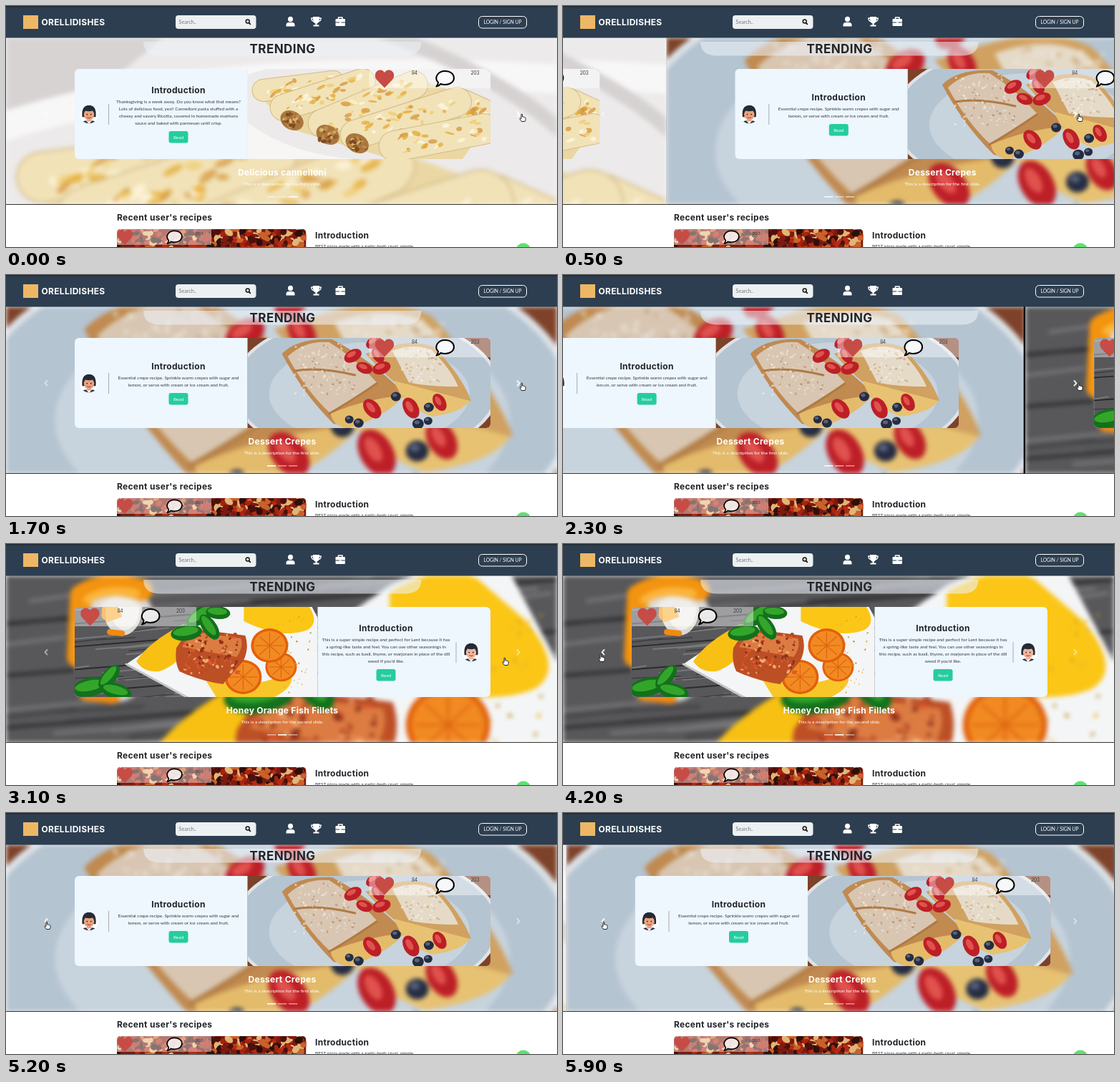
Write an HTML page that moves like this. It is 770 px wide and 337 px high and loops after 6 s.

```html
<!DOCTYPE html>
<html lang="en">
<head>
<meta charset="utf-8">
<title>Recipes carousel</title>
<style>
  html, body { margin: 0; width: 100%; height: 100%; overflow: hidden; background: #fff; }
  svg { display: block; }
  text { font-family: Lato, sans-serif; fill: #343a40; }
  .head { font-family: Inter, sans-serif; font-weight: 700; letter-spacing: .025em; fill: #212529; }
  .white { fill: #fff; }
  .mid { text-anchor: middle; }
</style>
</head>
<body>
<svg id="stage" width="770" height="337" viewBox="0 0 770 337"></svg>
<script>
const LOOP = 6000, STEP = 100, SLIDE = 600, W = 770;

let seed = 7;
const rnd = (a = 0, b = 1) => {
  seed = (seed * 16807) % 2147483647;
  return a + (b - a) * seed / 2147483647;
};
const repeat = (n, make) => Array.from({ length: n }, (_, i) => make(i)).join('');

// ---- drawing helpers ----
const rect = (x, y, w, h, fill, more = '') =>
  `<rect x="${x}" y="${y}" width="${w}" height="${h}" fill="${fill}" ${more}/>`;
const oval = (x, y, rx, ry, fill, turn = 0, more = '') =>
  `<ellipse cx="${x}" cy="${y}" rx="${rx}" ry="${ry}" fill="${fill}" transform="rotate(${turn} ${x} ${y})" ${more}/>`;
const shape = (d, fill, more = '') => `<path d="${d}" fill="${fill}" ${more}/>`;
const line = (d, color, width, more = '') =>
  `<path d="${d}" fill="none" stroke="${color}" stroke-width="${width}" stroke-linecap="round" stroke-linejoin="round" ${more}/>`;
const text = (x, y, size, str, cls = '') =>
  `<text x="${x}" y="${y}" dy=".35em" font-size="${size}" class="${cls}">${str}</text>`;
const at = (x, y, s, body) => `<g transform="translate(${x} ${y}) scale(${s})">${body}</g>`;
const specks = (n, x0, y0, x1, y1, r, colors, more = '') => repeat(n, i =>
  oval(rnd(x0, x1), rnd(y0, y1), rnd(r * .4, r), rnd(r * .3, r * .7), colors[i % colors.length], rnd(0, 180), more));

// ---- dishes, in the 339 x 126 space of a card picture ----
function cannelloni() {
  const roll = (x1, y1, x2, y2, w) => {
    const d = `M${x1} ${y1}L${x2} ${y2}`;
    const spots = repeat(30, i => {
      const k = rnd(.08, 1), j = w * .36;
      return oval(x1 + (x2 - x1) * k + rnd(-j, j) * .5, y1 + (y2 - y1) * k + rnd(-j, j),
        rnd(2, 7), rnd(1, 3.5), ['#e5a92f', '#efcb6c', '#d6953a', '#fff7e2'][i % 4], rnd(-50, 20), 'opacity=".75"');
    });
    return line(d, '#d3bb86', w + 2) + line(d, '#f1e2b8', w) + spots;
  };
  const filling = (x, y) => oval(x, y, 17, 13, '#a9773d', 30) +
    specks(22, x - 12, y - 9, x + 12, y + 9, 4, ['#7c4a22', '#c28b4b', '#935c2d', '#d9b36e']);
  return rect(-5, -70, 350, 240, '#eceaea') +
    shape('M0 -60L100 -60Q60 -20 0 5Z', '#d6d3d2') +
    line('M-5 0Q130 -45 345 -30', '#f8f7f7', 18) +
    line('M230 -60Q310 -30 345 5', '#d5d2d1', 9) +
    shape('M0 75Q60 120 150 126L0 126Z', '#f7f6f4') +
    shape('M10 30L120 8L240 14L325 45L339 70L300 126H200L60 84Z', '#ead7a3') +
    roll(300, 48, 335, 64, 38) +
    roll(22, 30, 120, 18, 30) + roll(50, 54, 160, 18, 36) +
    roll(104, 76, 232, 22, 38) + roll(150, 92, 292, 46, 40) + roll(205, 108, 330, 84, 42) +
    filling(62, 72) + filling(112, 92) + filling(153, 104);
}

function crepes() {
  const berry = (x, y, r = 7) => oval(x, y, r, r * .92, '#252c42') + oval(x - 1.5, y - 2, r * .45, r * .35, '#56617c');
  const straw = (x, y, turn, s = 1) => oval(x, y, 13 * s, 8.5 * s, '#bd1f27', turn) +
    oval(x - 2, y - 2, 7 * s, 3.5 * s, '#e0524e', turn);
  return rect(-5, -60, 350, 240, '#7d4229') +
    oval(165, 70, 187, 103, '#dde3e8') + oval(165, 70, 182, 99, '#b5c4d1') + oval(170, 78, 140, 72, '#c7d3dd') +
    shape('M48 22Q70 0 118 2Q165 25 222 80L165 112Q140 126 120 120Q76 76 48 22Z', '#c08a50') +
    shape('M56 26Q80 3 114 6Q150 28 180 62Q140 90 114 104Q82 74 56 26Z', '#d8c6b2') +
    line('M180 64Q145 88 114 106M66 46Q100 40 150 52', '#b07a42', 3) +
    shape('M190 14Q235 0 262 14Q300 55 312 88Q262 84 226 78Q190 52 165 22Z', '#d0a160') +
    shape('M202 18Q235 6 258 18Q284 44 294 68Q250 68 225 62Z', '#e5dac8') +
    shape('M205 60Q250 72 310 88Q300 104 258 110Q215 95 205 60Z', '#e7c272') +
    shape('M116 106Q160 86 220 80Q190 112 142 126Q120 126 116 106Z', '#e3bb6b') +
    specks(110, 66, 8, 150, 80, 2.4, ['#f2ece6', '#b98e66', '#eae0d6'], 'opacity=".7"') +
    specks(60, 215, 14, 270, 62, 2.4, ['#f5f0e8', '#c9a474'], 'opacity=".7"') +
    straw(176, 6, -35, .9) + straw(147, 25, -30) + straw(182, 24, 60, .9) +
    straw(163, 42, 20, .9) + straw(187, 42, -20) +
    berry(207, 82) + straw(174, 99, 50, 1.2) + straw(228, 98, 60, 1.2) + berry(155, 119) +
    berry(142, 114, 6) + berry(238, 120, 8) + berry(253, 97) + straw(268, 90, 60) + berry(252, 116, 6);
}

function fish() {
  const orange = (x, y, r) => oval(x, y, r, r * .92, '#e2600a') + oval(x, y, r * .86, r * .79, '#f28a22') +
    repeat(8, i => line(`M${x} ${y}L${x + r * .75 * Math.cos(i * .785)} ${y + r * .68 * Math.sin(i * .785)}`, '#dd6510', 1.2));
  const leaf = (x, y, rx, ry, turn) => oval(x, y, rx, ry, '#13701c', turn) +
    oval(x - 1, y - 2, rx * .8, ry * .55, '#34a52b', turn);
  const grain = (n, color, width) => repeat(n, () => {
    const x = rnd(-20, 300), y = rnd(-60, 130);
    return line(`M${x} ${y}l${rnd(30, 90)} ${rnd(-8, -3)}`, color, width);
  });
  return rect(-5, -70, 350, 240, '#58585b') + grain(45, '#78777a', 2) + grain(35, '#3d3d40', 1.5) +
    repeat(6, i => line(`M-5 ${-40 + i * 32}L345 ${-68 + i * 32}`, '#2b2b2d', 2)) +
    // cup with orange wedges
    oval(67, 2, 27, 38, '#dcd9d4') + oval(70, 3, 20, 29, '#efedea') +
    line('M84 -29Q62 -36 46 -26L44 12', '#f3930f', 13) + line('M80 -27Q62 -31 50 -23', '#fbb53c', 5) +
    shape('M42 -10Q62 -8 66 14L44 22Z', '#f9b13a') + line('M49 35L66 37', '#f08a12', 8) +
    // plate
    shape('M72 80L191 0L236 -32Q275 -50 311 -38L339 15L350 40V150H200Z', '#f4f5f6') +
    line('M72 80L200 150', '#c9c7c5', 3) +
    shape('M86 76Q104 48 152 24L165 40Q150 80 118 90Q96 92 86 76Z', '#f8c012') +
    shape('M236 -28Q268 -46 290 -36L320 -10Q345 20 325 32Q290 46 236 20Z', '#fbc616') +
    shape('M180 98Q240 120 300 92Q312 112 270 130H200Z', '#f9c62a') +
    orange(288, 84, 22) + orange(272, 54, 26) + orange(235, 98, 26) +
    // fillet
    shape('M160 30L238 40Q244 58 235 76L207 108Q176 104 146 90Q139 76 142 57Z', '#bd4f25') +
    shape('M162 34L232 44Q236 56 226 70L150 56Z', '#dc7c42') +
    specks(110, 152, 38, 230, 94, 3.2, ['#8c3018', '#eeaa6e', '#b34824', '#e0582c']) +
    leaf(176, 12, 24, 11, -35) + leaf(156, 36, 22, 11, -8) + leaf(188, 28, 20, 10, 55) + leaf(200, 8, 17, 9, 5) +
    leaf(22, 112, 26, 13, -12) + leaf(48, 98, 20, 10, -50) + leaf(58, 118, 22, 11, 15) +
    specks(40, 290, -20, 334, 124, 1.6, ['#b9942e', '#e9b428']);
}

// ---- interface parts ----
const heart = shape('M13.5 25L2.5 13.5C-1.5 9 0 1 6.5 0C10 -.5 12 1.5 13.5 3.5C15 1.5 17 -.5 20.5 0C27 1 28.5 9 24.5 13.5Z', '#c64c45');
const bubble = shape('M13.5 1C21 1 26 5 26 10.5S21 20 13.5 20Q10 20 7.5 19Q5 22 1.5 22.5Q4 19 4 17C-2.5 9.5 4 1 13.5 1Z',
  '#fff', 'fill-opacity=".8" stroke="#000" stroke-width="2" stroke-linejoin="round"');

const reactions = x => rect(x, 88, 170, 27, '#fff', 'opacity=".42"') +
  at(x + 8, 89.5, 1, heart) + text(x + 63.5, 94, 6.8, '84', 'mid') +
  at(x + 92.5, 90, 1, bubble) + text(x + 148, 94, 6.8, '203', 'mid');

const avatar = (x, skin) => `<g clip-path="url(#face)" transform="translate(${x} 151.5)">` +
  rect(-13, -13, 26, 26, '#fff') + at(0, 2.5, 1.25, oval(0, 12, 12, 7.5, '#2b3c4e') + shape('M-4 4H4L0 9Z', '#fff') +
    rect(-2.5, 1, 5, 5, skin) + shape('M-7.5 1Q-9 -12 0 -12.5Q9 -12 7.500 1Z', '#232b38') + oval(0, -2, 5.8, 6.5, skin) +
    shape('M-6.500 -3Q-7 -10 0 -10Q7 -10 6.500 -3L4 -6Q0 -5 -4 -6Z', '#232b38') +
    oval(-2.2, -2, .7, .7, '#222') + oval(2.2, -2, .7, .7, '#222') + line('M-2 1.5Q0 3 2 1.5', '#a13d35', .8)) + '</g>';

const slides = [
  { dish: crepes, rise: -8, title: 'Dessert Crepes', nth: 'first',
    body: ['Essential crepe recipe. Sprinkle warm crepes with sugar and', 'lemon, or serve with cream or ice cream and fruit.'] },
  { dish: fish, rise: 38, title: 'Honey Orange Fish Fillets', nth: 'second', flip: true,
    body: ['This is a super simple recipe and perfect for Lent because it has', 'a spring-like taste and feel. You can use other seasonings in',
      'this recipe, such as basil, thyme, or marjoram in place of the dill', 'weed if you\'d like.'] },
  { dish: cannelloni, rise: 56, title: 'Delicious cannelloni', nth: 'third',
    body: ['Thanksgiving is a week away. Do you know what that means?', 'Lots of delicious food, yes!! Cannelloni pasta stuffed with a',
      'cheesy and savory Ricotta, covered in homemade marinara', 'sauce and baked with parmesan until crisp.'] }
];

function slideMarkup(s) {
  const photo = s.dish();
  const mid = s.flip ? 531 : 241, photoX = s.flip ? 96 : 337.5;
  const top = s.body.length > 2 ? 118 : 128, button = top + 17 + s.body.length * 10;
  return `<g class="slide">${rect(0, 44, W, 234, '#f4f4f4')}
    <g filter="url(#soft)"><svg x="0" y="44" width="770" height="234" viewBox="0 ${-s.rise} 339 103" preserveAspectRatio="none">${photo}</svg></g>
    ${rect(0, 277, W, 1, '#333')}${rect(-2.5, 44, 2.5, 234, '#0a0a0a')}
    <g clip-path="url(#card)">${rect(96, 88, 581, 126, '#eef6fe')}
      <svg x="${photoX}" y="88" width="339.5" height="126" viewBox="0 0 339 126" preserveAspectRatio="none">${photo}</svg>
      ${reactions(s.flip ? 96 : 507.5)}</g>
    ${text(mid, top, 12, 'Introduction', 'head mid')}
    ${s.body.map((str, i) => text(mid, top + 15.5 + i * 10, 6.5, str, 'mid')).join('')}
    ${rect(mid - 13.5, button, 27, 16.5, '#25cd9d', 'rx="3"')}${text(mid, button + 8.3, 6.5, 'Read', 'white mid')}
    ${rect(s.flip ? 628.5 : 143, 137, 1, 29, '#a3abb3')}${avatar(s.flip ? 650 : 116, s.flip ? '#f0b59b' : '#eaa27f')}
    ${text(386, 233, 12, s.title, 'head white mid')}
    ${text(386, 249, 6.5, `This is a description for the ${s.nth} slide.`, 'white mid')}</g>`;
}

const header = rect(0, 0, W, 44.5, '#2c3e50') + rect(0, 0, W, 1.5, '#222a33') +
  rect(24, 13, 21, 19, '#edb765') + text(49.5, 22.5, 12, 'ORELLIDISHES', 'head white') +
  rect(237, 13, 112.5, 19, '#ecf0f1', 'rx="4"') + `<g opacity=".65">${text(241.5, 22.3, 7.2, 'Search..')}</g>` +
  line('M339.8 23.8L341.3 25.3', '#111', 1.8) + `<circle cx="337.7" cy="21.5" r="2.5" fill="none" stroke="#111" stroke-width="1.4"/>` +
  oval(397.5, 18.5, 3.5, 3.7, '#fff') + shape('M391.5 28.5V26.5Q391.5 23 395 23H400Q403.5 23 403.5 26.5V28.5Z', '#fff') +
  shape('M429 15H438V19Q437 24 434.5 24.5V26.5H437.5V28.5H429.5V26.5H432.5V24.5Q430 24 429 19Z', '#fff') +
  line('M429 17H426.8Q427 21.5 431 22M438 17H440.2Q440 21.5 436 22', '#fff', 1.4) +
  rect(460.5, 18, 13.5, 10, '#fff', 'rx="1.3"') + line('M464.5 18V16H470V18', '#fff', 1.5) +
  line('M460.5 23H474', '#2c3e50', 1) + rect(466, 22.3, 2.6, 2, '#fff') +
  rect(660.5, 14.5, 67, 16.5, 'none', 'rx="5" stroke="#fff"') + text(694, 22.7, 6.7, 'LOGIN / SIGN UP', 'white mid');

const recent = rect(0, 278, W, 59, '#fff') + text(155, 295.5, 12, 'Recent user\'s recipes', 'head') +
  `<g clip-path="url(#pizza)">${rect(155, 312, 264.5, 30, '#7a1a0e')}` +
  specks(260, 155, 312, 420, 338, 7, ['#4d100b', '#a8230f', '#c9622a', '#2e0f0b', '#e2b577', '#7d1a10', '#b52a14']) +
  rect(155, 312, 132, 22, '#fff', 'opacity=".42"') + '</g>' +
  at(155, 313, .83, heart) + at(224, 313.5, .84, bubble) + text(270, 317.5, 6.5, '203', 'mid') +
  text(432, 321, 12, 'Introduction', 'head') + text(432, 336, 6.5, 'BEST pizza made with a garlic-herb crust, simple') +
  oval(723, 342, 10.5, 10.5, '#5fe070');

const hand = shape('M-2 -4.5Q-1.2 -5.5 -.4 -4.5V-1Q1 -1.6 1.5 -.7Q2.7 -1 3 0Q4.3 0 4.2 1.5Q4.2 3.5 3.2 5.5H-1.6Q-3 3.2 -4.2 1.5Q-3.6 .2 -2 1.5Z',
  '#fff', 'stroke="#111" stroke-width=".9"');

const stage = document.getElementById('stage');
stage.innerHTML = `<defs>
  <filter id="soft" filterUnits="userSpaceOnUse" x="0" y="44" width="770" height="234" color-interpolation-filters="sRGB"><feGaussianBlur stdDeviation="3.2"/></filter>
  <clipPath id="card"><rect x="96" y="88" width="581" height="126" rx="6"/></clipPath>
  <clipPath id="pizza"><rect x="155" y="312" width="264.5" height="40" rx="5"/></clipPath>
  <clipPath id="face"><circle r="12.8"/></clipPath></defs>
  ${rect(0, 0, W, 337, '#fff')}${slides.map(slideMarkup).join('')}
  ${shape('M192 50H580.5Q580 69.5 557 69.5H215.5Q192.5 69.5 192 50Z', '#edf3f9', 'opacity=".56"')}
  ${text(386.5, 60, 17, 'TRENDING', 'head mid')}
  ${line('M57.5 148L54.5 151.3L57.5 154.6', '#fff', 1.9, 'class="arrow"')}
  ${line('M714.5 148L717.5 151.3L714.5 154.6', '#fff', 1.9, 'class="arrow"')}
  ${repeat(3, i => rect(365 + i * 15, 266, 12.3, 1.6, '#fff', 'class="dot"'))}
  ${recent}${header}<g id="hand">${hand}</g>`;

// ---- motion ----
// start, from, to, direction
const moves = [[80, 2, 0, 1], [2133, 0, 1, 1], [4582, 1, 0, -1], [5867, 0, 2, -1]];
// time, x, y
const path = [[0, 722, 156], [2950, 722, 156], [3100, 698, 164], [3850, 54, 159], [4400, 54, 159], [4550, 58, 157], [LOOP, 58, 157]];

const all = name => [...stage.querySelectorAll(name)];
const slideEls = all('.slide'), dots = all('.dot'), arrows = all('.arrow'), handEl = document.getElementById('hand');

// cubic-bezier(.42, 0, .58, 1)
function easeInOut(x) {
  if (x <= 0 || x >= 1) return x <= 0 ? 0 : 1;
  let lo = 0, hi = 1, s = .5;
  for (let i = 0; i < 24; i++) {
    s = (lo + hi) / 2;
    const bx = 3 * s * (1 - s) * (.42 * (1 - s) + .58 * s) + s ** 3;
    if (bx < x) lo = s; else hi = s;
  }
  return s * s * (3 - 2 * s);
}

function pointer(t) {
  const i = path.findIndex(p => p[0] > t);
  const a = path[i - 1], b = path[i], k = (t - a[0]) / (b[0] - a[0]);
  return [a[1] + (b[1] - a[1]) * k, a[2] + (b[2] - a[2]) * k];
}

function draw(t) {
  const [start, from, to, dir] = moves.filter(m => m[0] <= t).pop() || [0, 2, 2, 0];
  const k = easeInOut((t - start) / SLIDE);
  slideEls.forEach((el, i) => {
    const x = i === to ? dir * W * (1 - k) : -dir * W * k;
    const shown = i === to || (i === from && k < 1);
    el.style.display = shown ? '' : 'none';
    el.setAttribute('transform', `translate(${x.toFixed(2)} 0)`);
  });
  dots.forEach((el, i) => {
    const on = from === to ? +(i === to) : i === to ? k : i === from ? 1 - k : 0;
    el.setAttribute('opacity', .5 + .5 * on);
  });
  const [px, py] = pointer(t);
  arrows[0].setAttribute('opacity', px < 110 ? .9 : .5);
  arrows[1].setAttribute('opacity', px > 705 ? .9 : .5);
  handEl.setAttribute('transform', `translate(${px} ${py})`);
}

const origin = performance.now();
let last = 0;
function tick() {
  const t = Math.floor((performance.now() - origin) % LOOP / STEP) * STEP;
  if (t !== last) draw(last = t);
  requestAnimationFrame(tick);
}
draw(0);
requestAnimationFrame(tick);
</script>
</body>
</html>
```
